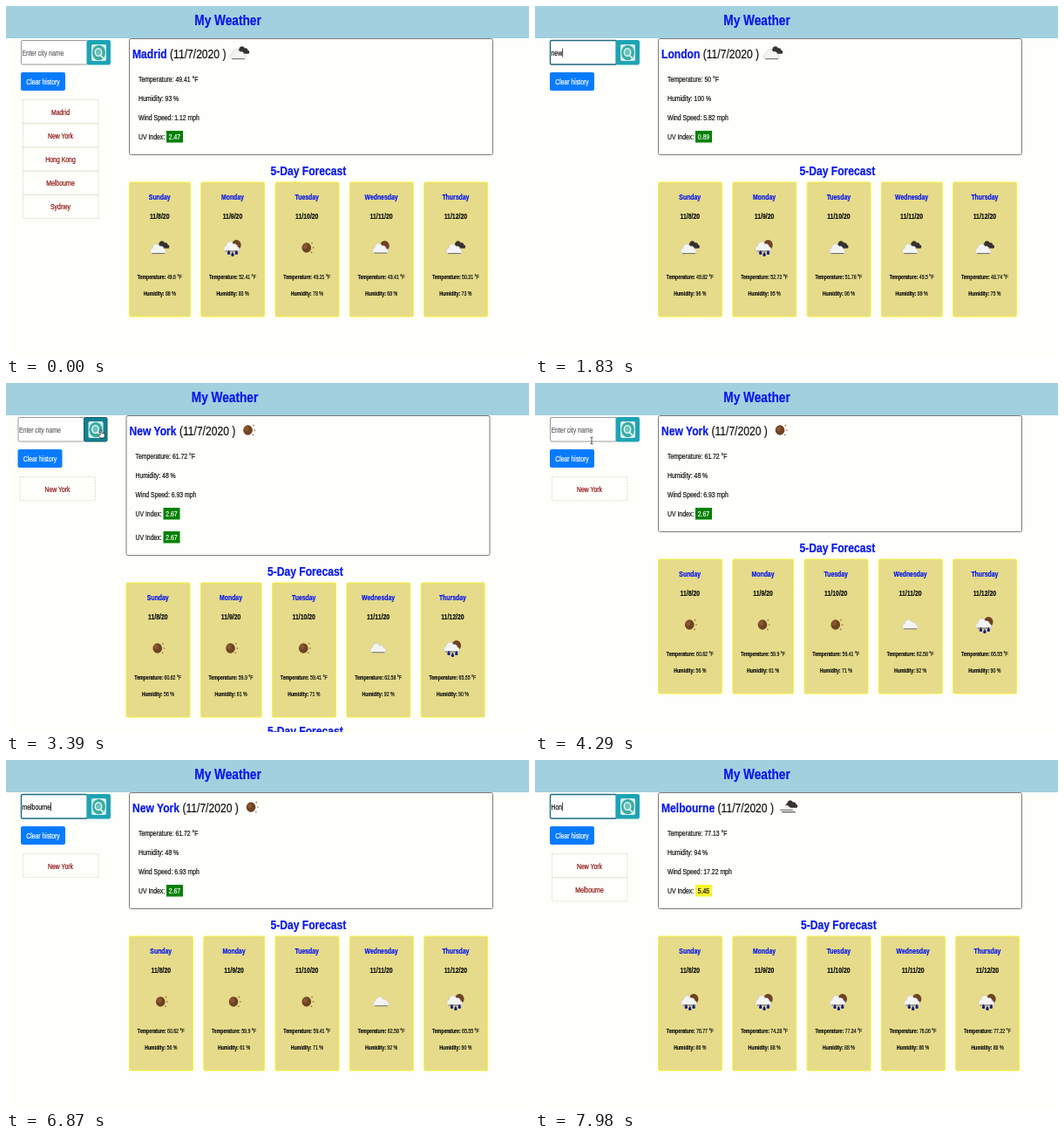
An HTML page for the animation above (8 s loop, 600 by 400 pixels).

```html
<!DOCTYPE html>
<html lang="en">
<head>
<meta charset="utf-8">
<title>My Weather</title>
<style>
  html, body { margin: 0; width: 100%; height: 100%; overflow: hidden; background: #fefefa; }
  svg { display: block; width: 600px; height: 400px; }
  text { font-family: "Liberation Sans", Arial, sans-serif; stroke-width: .22px; }
</style>
</head>
<body>
<svg id="stage" viewBox="0 0 600 400"></svg>
<script>
const LOOP = 8000;
const SQUEEZE = 0.787;
const BODY = 8.75, SMALL = 6.6, H3 = 15.4, H2 = 17.4;
const BLUE = '#0717ee', INK = '#111';
const DAYS = ['Sunday', 'Monday', 'Tuesday', 'Wednesday', 'Thursday'];

const scenes = {
  madrid: {
    city: 'Madrid', iconX: 268, icon: 'clouds', now: ['49.41', '93', '1.12', '2.47'],
    icons: ['clouds', 'rain', 'sun', 'partly', 'clouds'],
    temps: ['49.6', '52.41', '49.21', '49.41', '50.31'], humidity: [88, 83, 78, 68, 73],
    history: ['Madrid', 'New York', 'Hong Kong', 'Melbourne', 'Sydney']
  },
  london: {
    city: 'London', iconX: 273, icon: 'clouds', now: ['50', '100', '5.82', '0.89'],
    icons: ['clouds', 'rain', 'clouds', 'clouds', 'clouds'],
    temps: ['49.82', '52.72', '51.78', '49.5', '48.74'], humidity: [96, 95, 96, 89, 75],
    history: []
  },
  newYork: {
    city: 'New York', iconX: 281.5, icon: 'sun', now: ['61.72', '48', '6.93', '2.67'],
    icons: ['sun', 'sun', 'sun', 'cloud', 'rain'],
    temps: ['60.62', '59.9', '59.41', '62.58', '65.55'], humidity: [56, 61, 71, 92, 90],
    history: ['New York']
  },
  melbourne: {
    city: 'Melbourne', iconX: 290, icon: 'mist', now: ['77.13', '94', '17.22', '5.45'],
    icons: ['rain', 'rain', 'rain', 'rain', 'rain'],
    temps: ['76.77', '74.28', '77.34', '76.06', '77.22'], humidity: [86, 88, 88, 86, 88],
    history: ['New York', 'Melbourne']
  }
};
scenes.newYorkTwice = { ...scenes.newYork, doubled: true };

const sceneSteps = [[0, 'madrid'], [510, 'london'], [3150, 'newYorkTwice'], [4110, 'newYork'], [7260, 'melbourne']];
const typing = [
  { word: 'new york', focus: 1230, from: 1380, to: 2430, blur: 2880, clear: 3150 },
  { word: 'melbourne', focus: 4560, from: 4830, to: 6810, blur: 7080, clear: 7260 },
  { word: 'Hon', focus: 7560, from: 7680, to: 7950, blur: LOOP, clear: LOOP }
];
const clicks = [420, 2880, 7080];
const moves = [ // time, x, y
  [[60, 84, 76], [330, 52, 93], [810, 52, 93], [1170, 58, 55], [1380, 58, 55]],
  [[2460, 58, 55], [2790, 109, 55], [3180, 109, 54], [3900, 109, 54],
   [4200, 65, 66], [4320, 65, 66], [4500, 60, 55], [4830, 60, 55]],
  [[6900, 60, 55], [7050, 109, 55], [7290, 109, 54], [7500, 60, 55], [7680, 60, 55]]
];

function label(x, y, size, content, { fill = INK, weight = 400, anchor = 'start' } = {}) {
  return `<text transform="translate(${x} ${y}) scale(${SQUEEZE} 1)" font-size="${size}" ` +
    `fill="${fill}" stroke="${fill}" font-weight="${weight}" text-anchor="${anchor}">${content}</text>`;
}
const centered = (x, y, size, content, fill, weight) =>
  label(x, y, size, content, { fill, weight, anchor: 'middle' });
const bold = (s, fill = INK) => `<tspan font-weight="700" fill="${fill}" stroke="${fill}">${s}</tspan>`;
const box = (x, y, w, h, attrs) => `<rect x="${x}" y="${y}" width="${w}" height="${h}" ${attrs}/>`;

// Weather glyphs are drawn around their centre.
const puff = 'M-8 5C-11 4-10-1-7-1C-7-6 0-8 2-3C5-4 7-2 7 0C10 0 10 5 8 5Z';
const whiteCloud = `<path d="${puff}" fill="#f4f4f4" stroke="#c6c6c6" stroke-width=".6"/>` +
  '<path d="M-8 5H8" stroke="#6c6c6c" stroke-width="1"/>';
const darkCloud = `<path d="${puff}" transform="translate(4.5 -3) scale(.75)" fill="#35322f"/>`;
const drops = [[-4.5, 6], [0, 8], [4.5, 6]].map(([x, y]) =>
  `<path d="M${x} ${y - 3.5}c3 4 1.5 5 0 5s-3-1 0-5" fill="#1b1f86"/>`).join('');
const disc = (x, y) => `<circle cx="${x}" cy="${y}" r="5.5" fill="#6d4224"/>`;
const glyphs = {
  sun: disc(-.5, 0) + '<circle cx="-2" cy="-1.5" r="2.8" fill="#87552f"/>' +
    [[6, -5], [7.5, 0], [5.5, 5]].map(([x, y]) => `<circle cx="${x}" cy="${y}" r=".8" fill="#94652f"/>`).join(''),
  cloud: `<g transform="scale(.95 .9)">${whiteCloud}</g>`,
  clouds: darkCloud + `<g transform="translate(-1.5 1.5) scale(.95)">${whiteCloud}</g>`,
  partly: disc(4, -2) + `<g transform="translate(-1 1) scale(.95)">${whiteCloud}</g>`,
  rain: disc(4.5, -3) + `<g transform="translate(-1 -1) scale(.95)">${whiteCloud}</g>` + drops,
  mist: darkCloud + '<path d="M-6 1C-4-3 0-3 2 0L6 2Z" fill="#eee"/>' +
    '<path d="M-9 3H6M-7 5.3H9" stroke="#555" stroke-width="1"/>'
};
const icon = (name, x, y) => `<g transform="translate(${x} ${y}) scale(.97 1.06)">${glyphs[name]}</g>`;

function forecast(s, dy) {
  let x = 141, cards = '';
  s.temps.forEach((temp, i) => {
    const w = temp.length > 4 ? 73.5 : 70.4, mid = x + w / 2;
    cards += box(x + .5, 202 + dy, w - .5, 154, 'rx="1.5" fill="#e5db8a" stroke="#f8f238"') +
      centered(mid, 222 + dy, BODY, DAYS[i], BLUE, 700) +
      centered(mid, 244 + dy, BODY, `11/${8 + i}/20`, INK, 700) +
      icon(s.icons[i], mid, 277 + dy) +
      centered(mid, 313 + dy, SMALL, `${bold('Temperature:')} ${temp} °F`) +
      centered(mid, 331.5 + dy, SMALL, `${bold('Humidity:')} ${s.humidity[i]} %`);
    x += w + 11.8;
  });
  return centered((141 + x - 11.8) / 2, 194 + dy, H3, '5-Day Forecast', BLUE, 700) + cards;
}

function uvRow(value, y) {
  const high = value > 3;
  return label(152, y, BODY, 'UV Index:') +
    box(184, y - 10, 19, 13.5, `fill="${high ? '#fbf32c' : '#008000'}"`) +
    centered(193.5, y, BODY, value, high ? INK : '#fff');
}

function page(s) {
  const dy = s.doubled ? 27 : 0;
  const [temp, humidity, wind, uv] = s.now;
  const history = s.history.map((city, i) => {
    const y = 107.5 + 27.2 * i;
    return box(19.5, y, 86.5, 27.2, 'fill="none" stroke="#dadac4" stroke-width=".8" stroke-dasharray="2 1"') +
      centered(62.5, y + 17, BODY, city, '#8b1010');
  }).join('');
  return centered(254.5, 22, H2, 'My Weather', BLUE, 700) + history +
    box(141.5, 37.5, 417, 133 + dy, 'rx="2" fill="none" stroke="#7b7b7b"') +
    label(145, 59.5, H3, `${bold(s.city, BLUE)} (11/7/2020 )`) +
    icon(s.icon, s.iconX, 54) +
    label(152, 87, BODY, `Temperature: ${temp} °F`) +
    label(152, 109, BODY, `Humidity: ${humidity} %`) +
    label(152, 130.5, BODY, `Wind Speed: ${wind} mph`) +
    uvRow(uv, 153) + (s.doubled ? uvRow(uv, 180) : '') +
    forecast(s, dy) + (s.doubled ? forecast(s, 210) : '');
}

const stage = document.getElementById('stage');
stage.innerHTML = box(0, 0, 600, 37, 'fill="#a2d0de"') +
  `<g id="content">
    ${Object.entries(scenes).map(([name, s]) => `<g id="${name}">${page(s)}</g>`).join('')}
    <rect id="field" x="17.5" y="39.5" width="76" height="27.5" rx="1.5" fill="#fff"/>
    <g id="entry">${label(18.5, 56.5, BODY, '')}</g>
    <path id="caret" stroke="#111" stroke-width=".8"/>
    <rect id="search" x="93" y="39.5" width="26.5" height="27.5" rx="1.5"/>
    <rect x="98" y="44" width="17" height="19" rx="2" fill="#d9f1ee"/>
    <ellipse cx="106.5" cy="53.5" rx="7.5" ry="8.7" fill="#3aada5"/>
    <ellipse cx="106" cy="53" rx="3.7" ry="4.4" fill="#6cc4bb" stroke="#eefaf8" stroke-width="1.4"/>
    <path d="M108.5 56.5l3 3.3" stroke="#eefaf8" stroke-width="1.5"/>
    <rect id="clear" x="17" y="76" width="51" height="21" rx="2"/>
    ${centered(42.5, 90, BODY, 'Clear history', '#fff')}
  </g>
  <ellipse id="ring" rx="12.7" ry="15.8" fill="none" stroke="#111" stroke-width="1.5"/>
  <g id="pointer" stroke="#111" stroke-width=".7" fill="#fff">
    <path id="hand" d="M-.9 0Q0-1 .8 0V3.3L4 4.2Q4.7 4.6 4.4 6L3.6 9H-.8L-3.2 5.6Q-2.9 4.4-.9 5.8Z"/>
    <path id="beam" d="M-1.6-4Q0-4 0-3Q0-4 1.6-4M0-3V3M-1.6 4Q0 4 0 3Q0 4 1.6 4" fill="none"/>
    <path id="arrow" d="M0 0V9L1.8 7.2L3.2 10.3L4.4 9.6L3.2 6.8H5.5Z" fill="#111" stroke="#fff"/>
  </g>`;

const $ = id => document.getElementById(id);
const show = (id, on) => $(id).setAttribute('visibility', on ? 'visible' : 'hidden');
const set = (id, attrs) => Object.entries(attrs).forEach(([k, v]) => $(id).setAttribute(k, v));
const entry = $('entry').firstChild;

function pointerAt(t) {
  const path = moves.find(m => t >= m[0][0] && t < m[m.length - 1][0]);
  if (!path) return null;
  const i = path.findIndex(p => p[0] > t);
  const [t0, x0, y0] = path[i - 1], [t1, x1, y1] = path[i];
  const u = (t - t0) / (t1 - t0), e = u * u * (3 - 2 * u);
  return [x0 + (x1 - x0) * e, y0 + (y1 - y0) * e];
}

function draw(t) {
  const current = sceneSteps.filter(([at]) => t >= at).pop()[1];
  Object.keys(scenes).forEach(name => show(name, name === current));
  set('content', { transform: `translate(${scenes[current].doubled ? -3.5 : 0} 0)` });

  const turn = typing.find(k => t >= k.focus && t < k.clear);
  const focused = Boolean(turn) && t < turn.blur;
  let typed = '';
  if (turn && t >= turn.from) {
    const progress = Math.min(1, (t - turn.from) / (turn.to - turn.from));
    typed = turn.word.slice(0, 1 + Math.floor((turn.word.length - 1) * progress));
  }
  const entryColor = typed ? INK : '#62666a';
  entry.textContent = typed || 'Enter city name';
  entry.setAttribute('fill', entryColor);
  entry.setAttribute('stroke', entryColor);
  const caretX = 19 + (typed ? entry.getComputedTextLength() * SQUEEZE : 0);
  set('caret', { d: `M${caretX} 48.5V58.5` });
  show('caret', focused);
  set('field', { stroke: focused ? '#1b6a80' : '#999', 'stroke-width': focused ? 1.4 : 1 });

  const p = pointerAt(t);
  const over = (x0, y0, x1, y1) => Boolean(p) && p[0] > x0 && p[0] < x1 && p[1] > y0 && p[1] < y1;
  const onSearch = over(93, 39, 120, 67), onClear = over(17, 76, 68, 97), onField = over(17, 39, 93, 68);
  set('search', { fill: onSearch ? '#147f8f' : '#1ea3b5', stroke: onSearch ? '#11606b' : '#1ea3b5' });
  set('clear', { fill: onClear ? '#0762d4' : '#077bff' });

  show('hand', onSearch || onClear);
  show('beam', onField);
  show('arrow', p && !onSearch && !onClear && !onField);
  show('ring', p && clicks.some(c => t >= c && t < c + 150));
  if (p) {
    set('pointer', { transform: `translate(${p[0]} ${p[1]})` });
    set('ring', { cx: p[0], cy: p[1] - 1 });
  }
}

function frame() {
  draw(performance.now() % LOOP);
  requestAnimationFrame(frame);
}
frame();
</script>
</body>
</html>
```
